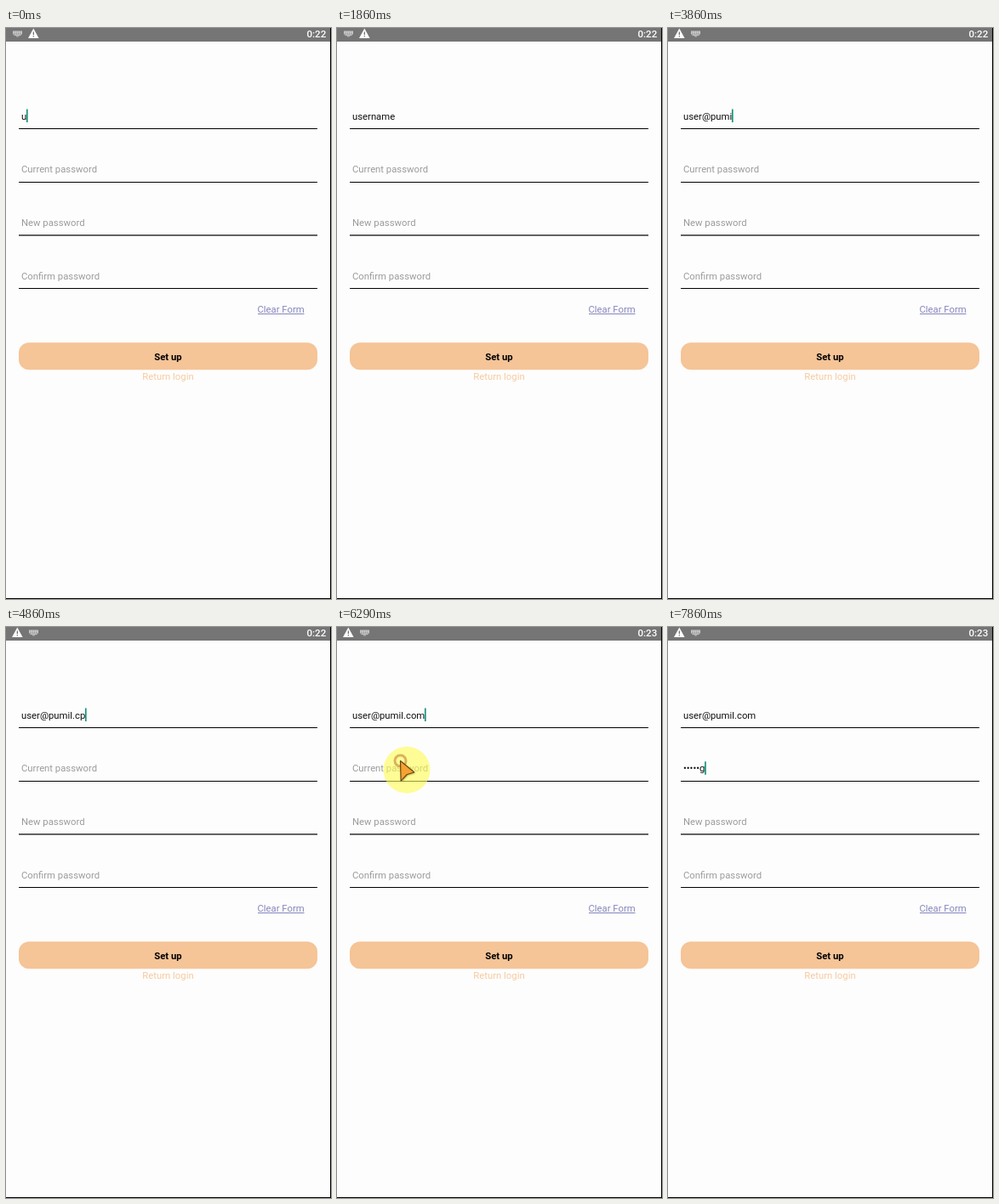
An HTML page with a canvas that plays this animation: 382 px wide and 672 px high, repeating every 8 s.

```html
<!DOCTYPE html>
<html lang="en">
<head>
<meta charset="utf-8">
<title>Password form</title>
<style>
html, body { margin: 0; width: 100%; height: 100%; overflow: hidden; background: #fdfdfd; }
canvas { display: block; width: 382px; height: 672px; }
</style>
</head>
<body>
<canvas id="stage"></canvas>
<script>
const W = 382, H = 672, LOOP = 8000;
const canvas = document.getElementById('stage');
const ctx = canvas.getContext('2d');
const dpr = window.devicePixelRatio || 1;
canvas.width = W * dpr;
canvas.height = H * dpr;

const FACE = 'Roboto, "Noto Sans", sans-serif';
const BODY = '11.3px ' + FACE;
const BASE = [107.5, 170.3, 233, 295.7];
const HINTS = ['', 'Current password', 'New password', 'Confirm password'];
const CARET = '#16957a';

// Typing runs: start, ms per key, keys ("<" is backspace)
const NAME_RUNS = [
  [0, 160, 'username'], [2010, 140, '<<<<'], [2720, 0, '@'],
  [3140, 215, 'pum'], [3860, 140, 'il'], [4290, 215, '.cp'], [5000, 140, '<om']
];
const PASS_RUNS = [[6700, 200, 'strong']];
const TAP = 6190, FOCUS = 6360, SWAP = 2500, TICK = 6200;
const POINTER_IN = 5710, POINTER_OUT = 6760;

function typed(runs, t, start) {
  let text = '', last = start;
  for (const [from, step, keys] of runs) {
    [...keys].forEach((key, i) => {
      const at = from + i * step;
      if (at > t) return;
      text = key === '<' ? text.slice(0, -1) : text + key;
      last = at;
    });
  }
  return { text, last };
}

function label(str, x, y, color, font = BODY, align = 'left') {
  ctx.font = font;
  ctx.fillStyle = color;
  ctx.textAlign = align;
  ctx.fillText(str, x, y);
}

function box(x, y, w, h, color) {
  ctx.fillStyle = color;
  ctx.fillRect(x, y, w, h);
}

function caret(str, row, since) {
  if (since % 1000 >= 500) return;
  ctx.font = BODY;
  box(18 + ctx.measureText(str).width - 0.3, BASE[row] - 12, 1.7, 15.5, CARET);
}

function warning(x) {
  ctx.fillStyle = '#fff';
  ctx.beginPath();
  ctx.moveTo(x + 6.3, 0.5);
  ctx.lineTo(x + 12.6, 12);
  ctx.lineTo(x, 12);
  ctx.fill();
  box(x + 5.7, 4.5, 1.3, 3.7, '#757575');
  box(x + 5.7, 9.2, 1.3, 1.3, '#757575');
}

function keyboard(x) {
  box(x, 3.5, 11, 4, '#c9c9c9');
  box(x + 1.5, 7.5, 8, 1.6, '#c0c0c0');
  for (let i = 0; i < 4; i++) {
    box(x + 1.3 + i * 2.4, 4.6, 1, 0.8, '#858585');
    box(x + 1.3 + i * 2.4, 6.2, 1, 0.8, '#858585');
  }
  box(x + 4, 9.1, 3, 1.4, '#b0b0b0');
}

function statusBar(t) {
  box(0, 0, W, 16, '#757575');
  const swapped = t >= SWAP;
  warning(swapped ? 7 : 26);
  keyboard(swapped ? 27 : 8);
  label(t < TICK ? '0:22' : '0:23', 353.4, 11, '#fff', '500 11.6px ' + FACE);
}

function form(t) {
  const name = typed(NAME_RUNS, t, 0);
  const pass = typed(PASS_RUNS, t, FOCUS);

  label(name.text, 18, BASE[0], '#111');
  HINTS.forEach((hint, i) => {
    if (i !== 1 || !pass.text) label(hint, 18, BASE[i], '#9b9b9b');
  });
  const shown = '•'.repeat(Math.max(0, pass.text.length - 1)) + pass.text.slice(-1);
  label(shown, 18, BASE[1], '#111');

  box(15, 118, 351, 1, '#000');
  box(15, 181, 351, 1, '#000');
  box(15, 243.3, 351, 1.3, '#111');
  box(15, 306, 351, 1, '#000');

  if (t < FOCUS) caret(name.text, 0, t - name.last);
  else caret(shown, 1, t - pass.last);

  label('Clear Form', 295.5, 335, '#8585bd');
  box(296, 336, 54.5, 1, '#8585bd');

  ctx.fillStyle = '#f5c497';
  ctx.beginPath();
  ctx.roundRect(15, 370.2, 351, 32, 12);
  ctx.fill();
  label('Set up', 190.5, 391, '#000', 'bold ' + BODY, 'center');
  label('Return login', 190.5, 414, '#f6caa0', BODY, 'center');
}

function pointer(t) {
  if (t < POINTER_IN || t >= POINTER_OUT) return;
  const p = Math.min(1, Math.max(0, (t - 5860) / (TAP - 5860)));
  const ease = p * p * (3 - 2 * p);
  const x = 69.5 + 5 * ease, y = 123.5 + 34 * ease;

  ctx.fillStyle = 'rgba(255,252,80,0.6)';
  ctx.beginPath();
  ctx.arc(x + 7.5, y + 10.7, 27.5, 0, 7);
  ctx.fill();

  if (t >= TAP && t < TAP + 260) {
    ctx.strokeStyle = 'rgba(205,155,75,0.75)';
    ctx.lineWidth = 3;
    ctx.beginPath();
    ctx.arc(x, y, 6.5, 0, 7);
    ctx.stroke();
  }

  ctx.save();
  ctx.translate(x, y);
  ctx.beginPath();
  ctx.moveTo(0, 0);
  ctx.lineTo(16.3, 13.5);
  ctx.lineTo(7.8, 16);
  ctx.lineTo(0.6, 23.6);
  ctx.closePath();
  ctx.shadowColor = 'rgba(80,70,20,0.5)';
  ctx.shadowBlur = 2 * dpr;
  ctx.shadowOffsetX = ctx.shadowOffsetY = dpr;
  ctx.fillStyle = '#f5a430';
  ctx.fill();
  ctx.shadowColor = 'transparent';
  ctx.strokeStyle = '#6e4716';
  ctx.lineWidth = 1.2;
  ctx.lineJoin = 'round';
  ctx.stroke();
  ctx.restore();
}

function draw(t) {
  ctx.setTransform(dpr, 0, 0, dpr, 0, 0);
  box(0, 0, W, H, '#fdfdfd');
  form(t);
  pointer(t);
  statusBar(t);
  box(381, 0, 1, H, '#000');
  box(0, 671, W, 1, '#000');
}

const begin = performance.now();
function frame() {
  draw((performance.now() - begin) % LOOP);
  requestAnimationFrame(frame);
}
frame();
</script>
</body>
</html>
```
